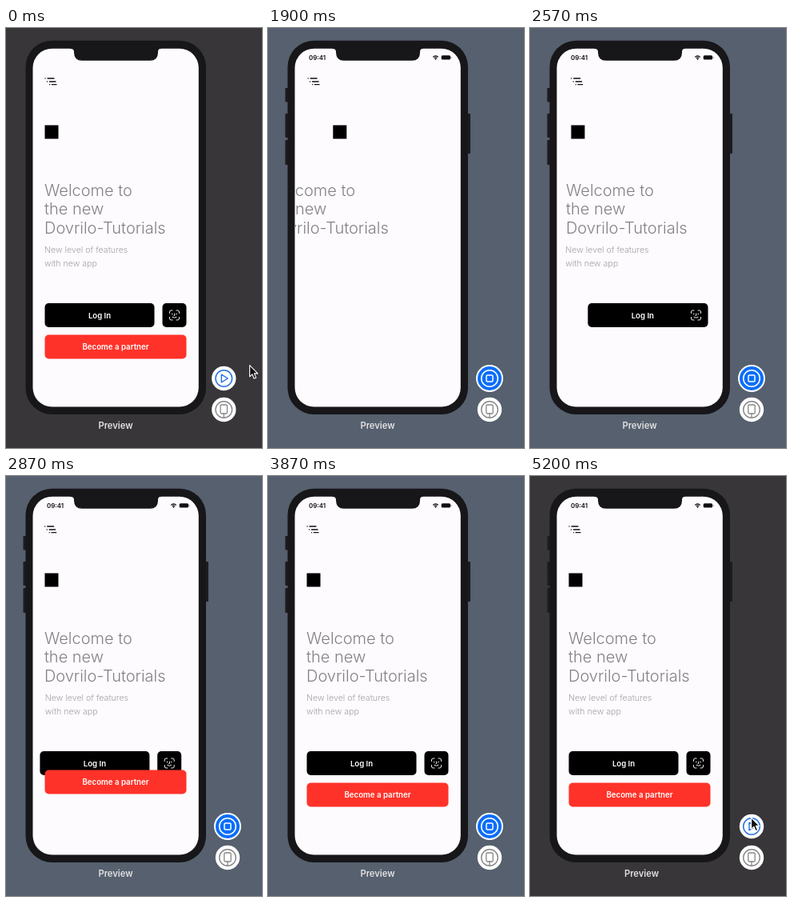
Animation of 320 by 525 pixels, one loop 5.23 s. Source, as an HTML page with a canvas:

```html
<!DOCTYPE html>
<html lang="en">
<head>
<meta charset="utf-8">
<title>Preview</title>
<style>
  html, body { margin: 0; width: 100%; height: 100%; overflow: hidden; background: #393639; }
  canvas { display: block; width: 320px; height: 525px; }
</style>
</head>
<body>
<canvas id="stage"></canvas>
<script>
const LOOP = 5230, W = 320, H = 525;
const LIVE_AT = 1300, STOP_AT = 4670;
const FONT = 'Inter, "Liberation Sans", sans-serif';
const DARK = [57, 54, 57], SLATE = [86, 96, 110];
const canvas = document.getElementById('stage');
const ctx = canvas.getContext('2d');
const dpr = window.devicePixelRatio || 1;
canvas.width = W * dpr;
canvas.height = H * dpr;

const clamp = v => Math.max(0, Math.min(1, v));
const lerp = (a, b, p) => a + (b - a) * p;
const ramp = (t, from, to) => clamp((t - from) / (to - from));
const smooth = p => p * p * (3 - 2 * p);

// Damped spring from an offset to rest; wd is the damped frequency in rad/s.
function spring(t, start, offset, damping, wd) {
  const s = (t - start) / 1000;
  if (s <= 0) return offset;
  const r = damping / Math.sqrt(1 - damping * damping);
  return offset * Math.exp(-r * wd * s) * (Math.cos(wd * s) + r * Math.sin(wd * s));
}

function box(x, y, w, h, r, fill) {
  ctx.beginPath();
  ctx.roundRect(x, y, w, h, r);
  ctx.fillStyle = fill;
  ctx.fill();
}

function disc(x, y, r, fill) {
  ctx.beginPath();
  ctx.arc(x, y, r, 0, 7);
  ctx.fillStyle = fill;
  ctx.fill();
}

function ring(x, y, r, color, width) {
  ctx.beginPath();
  ctx.arc(x, y, r, 0, 7);
  ctx.strokeStyle = color;
  ctx.lineWidth = width;
  ctx.stroke();
}

function strokePath(d, color, width) {
  ctx.strokeStyle = color;
  ctx.lineWidth = width;
  ctx.lineCap = ctx.lineJoin = 'round';
  ctx.stroke(new Path2D(d));
}

function label(str, x, y, weight, size, color, align = 'left') {
  ctx.font = `${weight} ${size}px ${FONT}`;
  ctx.textAlign = align;
  ctx.fillStyle = color;
  ctx.fillText(str, x, y);
}

function shifted(dx, dy, draw) {
  ctx.save();
  ctx.translate(dx, dy);
  draw();
  ctx.restore();
}

function menuIcon() {
  strokePath('M49 63h.1M52 63h8M51.5 67h.1M54.5 67h7.5M54.5 70.7h.1M57.3 70.7h5.7', '#111', 1.3);
}

function title() {
  ['Welcome to', 'the new', 'Dovrilo-Tutorials'].forEach((line, i) =>
    label(line, 48, 209.5 + i * 23.7, 300, 20, '#838184'));
}

function subtitle() {
  label('New level of features', 48, 281, 300, 10.6, '#a3a1a4');
  label('with new app', 48, 298, 300, 10.6, '#a3a1a4');
}

function loginButton() {
  box(48.5, 344, 137, 30, 5, '#000');
  label('Log In', 117, 362.5, 600, 9.6, '#fff', 'center');
}

function faceButton() {
  box(195.5, 344, 30, 30, 5, '#000');
  strokePath('M204.5 356.5v-1.5q0-2 2-2h1.5M213 353h1.5q2 0 2 2v1.5' +
    'M216.5 361.5v1.5q0 2-2 2h-1.5M208 365h-1.5q-2 0-2-2v-1.5' +
    'M207.8 357v1M213.2 357v1M210.7 357v2.5h-.7M208 361.4q2.5 2 5 0', '#fff', 0.95);
}

function partnerButton() {
  box(48.5, 383.5, 177, 30, 5, '#ff3229');
  label('Become a partner', 137, 402, 600, 9.7, '#fff', 'center');
}

function content(t) {
  const live = t >= LIVE_AT;
  const at = (...args) => live ? spring(t, ...args) : 0;
  shifted(at(1596, 200, .55, 7), 0, menuIcon);
  shifted(at(1660, 185, .55, 7), 0, () => box(48.5, 121.5, 17, 17, 0, '#000'));
  shifted(at(1683, -190, .55, 7), 0, title);
  shifted(at(2150, -200, .85, 5.27), 0, subtitle);
  shifted(at(2309, 195, .7, 6.9), 0, loginButton);
  shifted(at(2080, 217, .7, 5), 0, faceButton);
  shifted(0, at(2415, 348, .7, 6.9), partnerButton);
}

function statusBar() {
  label('09:41', 51, 39.8, 600, 7.9, '#111');
  ctx.lineCap = 'butt';
  for (const r of [2.6, 4.7]) {
    ctx.beginPath();
    ctx.arc(209.5, 39.7, r, -Math.PI * .75, -Math.PI * .25);
    ctx.strokeStyle = '#111';
    ctx.lineWidth = 1.3;
    ctx.stroke();
  }
  disc(209.5, 39.1, .9, '#111');
  box(216.7, 34.3, 11.4, 5.2, 1.5, '#111');
  box(228.6, 36, .9, 1.9, .5, '#777');
}

function phone(t) {
  const live = t >= LIVE_AT;
  if (live) {
    for (const [x, y, h] of [[21.5, 75, 17.5], [21.5, 107, 30], [21.5, 140, 31], [249, 107, 50]])
      box(x, y, 4, h, 1, '#1d1c1f');
  }
  box(24.5, 15.7, 225.5, 467.3, 33, '#171619');
  ctx.save();
  ctx.beginPath();
  ctx.roundRect(33.5, 25.7, 207.3, 447.8, 24);
  ctx.fillStyle = '#fdfbfe';
  ctx.fill();
  ctx.clip();
  content(t);
  if (live) statusBar();
  ctx.restore();
  ctx.fillStyle = '#171619';
  ctx.fill(new Path2D('M80 25h114v.7q-4 0-4 4v1q0 10-10 10H95q-10 0-10-10v-1q0-4-5-4z'));
}

function controls(t) {
  const x = lerp(272.3, 277, smooth(ramp(t, 1190, 1400)));
  const running = t >= 600 && t < STOP_AT;
  if (running) {
    disc(x, 438, 17, '#fff');
    disc(x, 438, 15, '#0b6ef9');
    ring(x, 438, 10.3, '#fff', 1.6);
    ctx.beginPath();
    ctx.roundRect(x - 4, 434, 8, 8, 1.2);
    ctx.strokeStyle = '#fff';
    ctx.lineWidth = 1.5;
    ctx.stroke();
  } else {
    disc(x, 438, 15.2, '#fff');
    ring(x, 438, 10.3, '#2572e8', 1.5);
    strokePath(`M${x - 3} 433.2v9.6l8-4.8z`, '#2572e8', 1.4);
  }
  disc(x, 477, 15.2, '#fff');
  ring(x, 477, 10.3, '#878688', 1.4);
  ctx.beginPath();
  ctx.roundRect(x - 4.2, 471, 8.4, 11, 1.6);
  ctx.strokeStyle = '#878688';
  ctx.lineWidth = 1.3;
  ctx.stroke();
  strokePath(`M${x} 482v5`, '#878688', 1.3);
}

const track = [
  [0, 304, 421], [30, 304, 421], [440, 274, 436], [640, 274, 436], [980, 328, 418],
  [3840, 328, 418], [4300, 275, 434], [4670, 275, 434], [5170, 275, 430], [5200, 276, 426.5], [LOOP, 276, 426.5]
];

function cursor(t) {
  const i = track.findIndex((k, n) => n && t <= k[0]);
  const [t0, x0, y0] = track[i - 1], [t1, x1, y1] = track[i];
  const p = smooth(ramp(t, t0, t1));
  shifted(lerp(x0, x1, p), lerp(y0, y1, p), () => {
    const arrow = new Path2D('M.6.6v14.2l3.2-3 2.3 5.4 2.5-1.1-2.3-5.2h4.4z');
    ctx.fillStyle = '#111';
    ctx.fill(arrow);
    ctx.strokeStyle = '#fff';
    ctx.lineWidth = 1.1;
    ctx.lineJoin = 'round';
    ctx.stroke(arrow);
  });
}

function caption(t) {
  const right = smooth(ramp(t, 560, 660)) - smooth(ramp(t, 1190, 1400)) + smooth(ramp(t, 4670, 4800));
  label('Preview', 137 + 2.5 * right, 501.3, 600, 11.2, '#e2e1e3', 'center');
}

function draw(t) {
  const glow = ramp(t, 570, 1030) - ramp(t, STOP_AT, 5170);
  ctx.setTransform(dpr, 0, 0, dpr, 0, 0);
  ctx.fillStyle = `rgb(${DARK.map((c, i) => Math.round(lerp(c, SLATE[i], glow)))})`;
  ctx.fillRect(0, 0, W, H);
  phone(t);
  caption(t);
  controls(t);
  cursor(t);
}

const began = performance.now();
function tick() {
  draw((performance.now() - began) % LOOP);
  requestAnimationFrame(tick);
}
tick();
</script>
</body>
</html>
```
